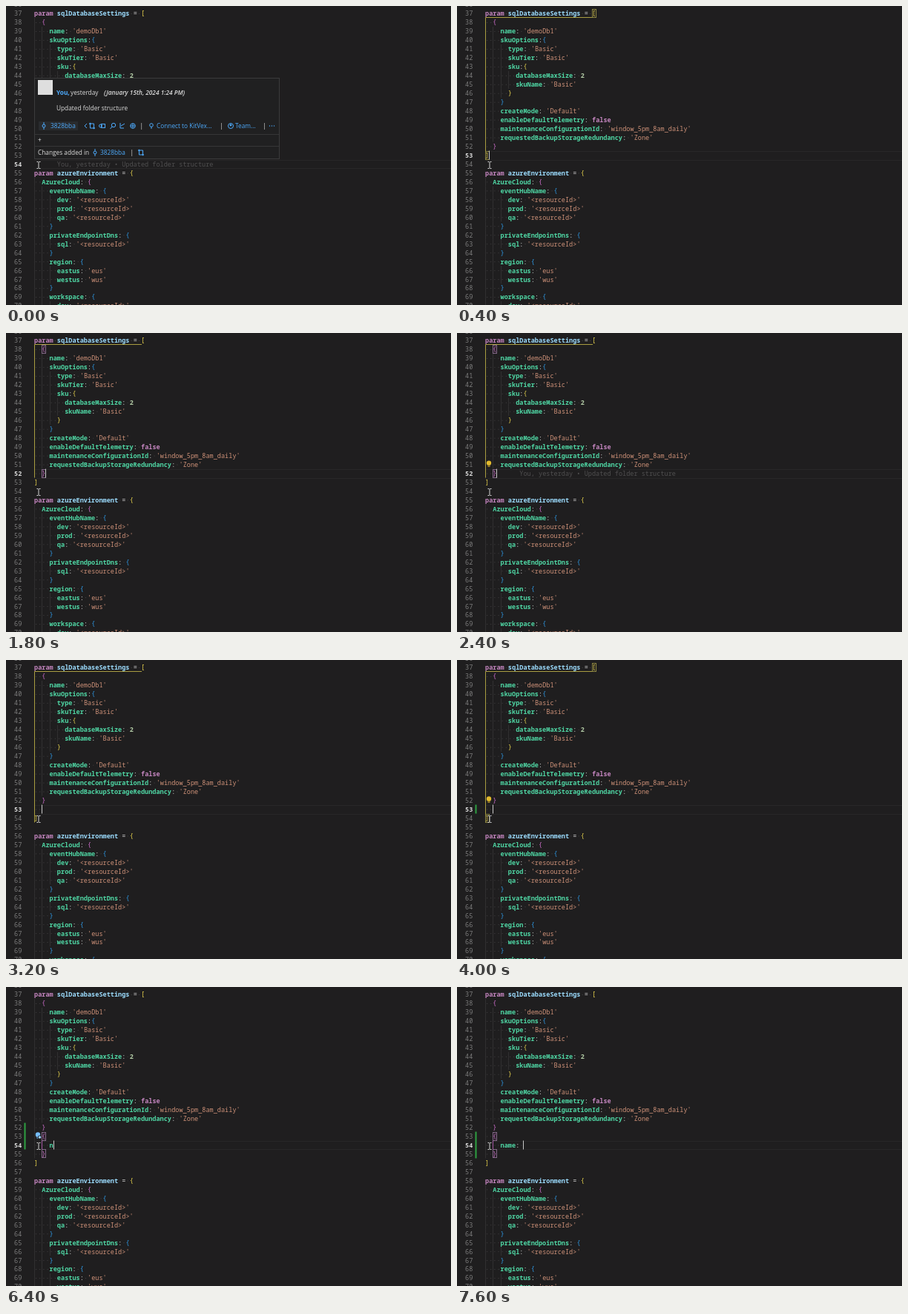
Animation of 600x404 px, one loop 8 s. Source, as an HTML page with a canvas:

```html
<!DOCTYPE html>
<html lang="en">
<head>
<meta charset="utf-8">
<title>Editing a settings array</title>
<style>
  html, body { margin: 0; width: 100%; height: 100%; overflow: hidden; background: #1f1e1f; }
  canvas { display: block; width: 600px; height: 404px; }
</style>
</head>
<body>
<canvas id="stage"></canvas>
<script>
const canvas = document.getElementById('stage');
const ctx = canvas.getContext('2d');
const ratio = window.devicePixelRatio || 1;
canvas.width = 600 * ratio;
canvas.height = 404 * ratio;

const LOOP = 8000, FIRST = 36, LEFT = 38, CHAR = 5.145, ROW = 11.97, BASE = 3.4;
const MONO = '8.575px "Noto Sans Mono", "DejaVu Sans Mono", monospace';
const UI = '"Open Sans", "Noto Sans", sans-serif';
const GOLD = '#e8d44d', PINK = '#d16fce', BLUE = '#2f9be8', LINK = '#4daafc';
const BRACKETS = [GOLD, PINK, BLUE];

const head = `
param sqlDatabaseSettings = [
  {
    name: 'demoDb1'
    skuOptions:{
      type: 'Basic'
      skuTier: 'Basic'
      sku:{
        databaseMaxSize: 2
        skuName: 'Basic'
      }
    }
    createMode: 'Default'
    enableDefaultTelemetry: false
    maintenanceConfigurationId: 'window_5pm_8am_daily'
    requestedBackupStorageRedundancy: 'Zone'
  }`.split('\n');

const tail = `]

param azureEnvironment = {
  AzureCloud: {
    eventHubName: {
      dev: '<resourceId>'
      prod: '<resourceId>'
      qa: '<resourceId>'
    }
    privateEndpointDns: {
      sql: '<resourceId>'
    }
    region: {
      eastus: 'eus'
      westus: 'wus'
    }
    workspace: {
      dev: '<resourceId>'`.split('\n');

const words = ['name', 'skuName', 'eventHubName', 'region', 'enableDefaultTelemetry',
  'maintenanceConfigurationId', 'azureEnvironment', 'sqlDatabaseSettings', 'privateEndpointDns'];

const block = text => ['  {', '    ' + text, '  }'];
const arrayPair = end => [[37, 28], [end, 0]];
const typed = (text, more) => ({ added: block(text), col: 4 + text.length, ...more });

// Each step changes the editor state from its time on.
const steps = [
  [0, { added: [], row: 54, col: 0, caret: false, popup: true, blame: true, pair: [] }],
  [200, { popup: false, caret: true }],
  [400, { row: 53, col: 1, blame: false, pair: arrayPair(53), guide: 53 }],
  [800, { blame: true }],
  [1000, { bulb: 52, caret: false }],
  [1200, { caret: true }],
  [1400, { row: 52, col: 1, blame: false, bulb: 0 }],
  [1800, { col: 3, pair: [[38, 2], [52, 2]] }],
  [2000, { blame: true, bulb: 51 }],
  [2600, { caret: false }],
  [3000, { added: ['  '], row: 53, col: 2, caret: true, blame: false, bulb: 0, pair: [], guide: 54 }],
  [3400, { bar: [53, 53] }],
  [4000, { bulb: 52, pair: arrayPair(54) }],
  [4400, { added: ['  {}'], col: 3, bulb: 0, pair: [[53, 2], [53, 3]], guide: 0 }],
  [4600, typed('', { row: 54, pair: [[53, 2], [55, 2]], inner: true })],
  [4800, { bulb: 52, blueBulb: true, errors: true }],
  [5400, { caret: false }],
  [5600, { caret: true }],
  [6000, { errors: false, bar: [52, 54] }],
  [6200, typed('n', { bulb: 53 })],
  [6600, { list: 9, bulb: 0 }],
  [6800, typed('na', { list: 3, bar: [53, 55] })],
  [7000, typed('nam', { list: 2 })],
  [7200, typed('name')],
  [7400, typed('name:', { list: 0 })],
  [7600, typed('name: ')]
];

const colX = col => LEFT + col * CHAR;
const midY = row => 10 + (row - 37) * ROW;
const topY = row => midY(row) - ROW / 2;

function fill(color, x, y, w, h) {
  ctx.fillStyle = color;
  ctx.fillRect(x, y, w, h);
}

function line(color, points) {
  ctx.strokeStyle = color;
  ctx.lineWidth = 1;
  ctx.beginPath();
  points.forEach(([x, y]) => ctx.lineTo(x, y));
  ctx.stroke();
}

function frame(color, x, y, w, h) {
  ctx.strokeStyle = color;
  ctx.lineWidth = 1;
  ctx.strokeRect(x, y, w, h);
}

function disc(color, x, y, r) {
  ctx.fillStyle = color;
  ctx.beginPath();
  ctx.arc(x, y, r, 0, 7);
  ctx.fill();
}

function ring(color, x, y, r) {
  ctx.strokeStyle = color;
  ctx.lineWidth = 1;
  ctx.beginPath();
  ctx.arc(x, y, r, 0, 7);
  ctx.stroke();
}

function text(string, x, y, color, font) {
  ctx.font = font;
  ctx.fillStyle = color;
  ctx.fillText(string, x, y);
}

const ui = (string, x, y, color = '#dcdcdc', style = '') =>
  text(string, x, y + 3, color, `${style} 8.3px ${UI}`);

function tokenColor(token, rest) {
  if (token[0] === "'") return '#ce9178';
  if (token === 'param' || token === 'false') return '#c586c0';
  if (/^\d/.test(token)) return '#b5cea8';
  if (/^\w/.test(token)) return rest[0] === ' ' ? '#9cdcfe' : '#4fd6a4';
  return '#d4d4d4';
}

function drawCode(lines) {
  let depth = 0;
  lines.forEach((source, i) => {
    const row = FIRST + i, y = midY(row);
    const indent = source.search(/\S|$/);
    for (let col = 0; col < indent; col += 2) {
      fill('#313031', Math.round(colX(col)), topY(row), 1, ROW);
    }
    for (const match of source.matchAll(/'[^']*'|\w+|\S| /g)) {
      const token = match[0], x = colX(match.index);
      if (token === ' ') {
        fill('#454345', x + 2.1, y, 1, 1);
        continue;
      }
      let color = tokenColor(token, source.slice(match.index + token.length));
      if (/[\[{]/.test(token)) color = BRACKETS[depth++ % 3];
      if (/[\]}]/.test(token)) color = BRACKETS[--depth % 3];
      const weight = /^\w/.test(token) ? 600 : 500;
      text(token, x, y + BASE, color, `${weight} ${MONO}`);
    }
  });
}

function drawNumbers(count, active) {
  for (let row = FIRST; row < FIRST + count; row++) {
    const on = row === active;
    text(row, 11, midY(row) + BASE, on ? '#d8d8d8' : '#7c7c7c', (on ? '600 ' : '') + MONO);
  }
}

function drawGuides(state) {
  if (state.guide) {
    const end = Math.round(topY(state.guide)) + 11.5;
    const bottom = state.row === 52 ? end - 12 : end;
    line('#a99d41', [[colX(28) + 1, 15.5], [38.5, 15.5], [38.5, bottom]]);
  }
  if (state.inner) line('#a657a5', [[48.5, topY(54)], [48.5, topY(55)]]);
  for (const [row, col] of state.pair) {
    const color = row === 37 || col === 0 ? '#8f8842' : '#85688a';
    frame(color, Math.round(colX(col)) + 0.5, Math.round(topY(row)) + 0.5, 5, 11);
  }
}

function squiggle(from, to, y) {
  const points = [];
  for (let x = from; x <= to; x += 2) points.push([x, y + (points.length % 2 ? -1 : 0.5)]);
  line('#f14c4c', points);
}

function drawBulb(row, blue) {
  const y = midY(row) - 1.5, color = blue ? '#75beff' : '#e3ba2c';
  disc(color, 43, y - 0.5, 3.2);
  fill(color, 41.5, y + 2, 3, 2.6);
  fill('#1f1e1f', 41.5, y + 2.8, 3, 0.7);
  if (blue) {
    disc('#1f1e1f', 45.5, y + 3, 2.6);
    disc('#9dd2ff', 45.5, y + 3, 1.8);
  }
}

function drawPointer() {
  line('#d6d6d6', [[44, 211], [44, 219]]);
  for (const y of [210.5, 219.5]) {
    line('#d6d6d6', [[41.5, y], [43.5, y]]);
    line('#d6d6d6', [[44.5, y], [46.5, y]]);
  }
}

function commitIcon(x, y) {
  ring(LINK, x, y, 2);
  line(LINK, [[x, y - 5], [x, y - 2]]);
  line(LINK, [[x, y + 2], [x, y + 5]]);
}

function compareIcon(x, y) {
  line(LINK, [[x - 2.5, y - 2], [x - 2.5, y + 3], [x + 1, y + 3]]);
  line(LINK, [[x - 1, y - 3], [x + 2.5, y - 3], [x + 2.5, y + 2]]);
  disc(LINK, x - 2.5, y - 3, 1.3);
  disc(LINK, x + 2.5, y + 3, 1.3);
}

function drawPopup() {
  fill('#202021', 38, 97, 330, 110);
  frame('#3b3b3c', 38.5, 97.5, 330, 109);
  fill('#dedede', 43, 100, 20, 20);
  ui('You,', 68, 117, LINK, 'bold');
  ui('yesterday', 87, 117);
  ui('(January 15th, 2024 1:24 PM)', 132, 117, '#dcdcdc', 'italic 600');
  ui('Updated folder structure', 68, 138);

  fill('#292b2e', 44, 156, 53, 12);
  commitIcon(51, 162);
  ui('3828bba', 60, 162, LINK);
  line(LINK, [[109, 159], [106, 162], [109, 165]]);
  compareIcon(116, 162);
  frame(LINK, 128.5, 159.5, 5, 5);
  ring(LINK, 127.5, 162, 2);
  ring(LINK, 145, 161, 2.7);
  line(LINK, [[143, 163], [140.5, 166]]);
  line(LINK, [[154, 158], [154, 165], [159, 165]]);
  line(LINK, [[155, 162], [160, 159]]);
  ring(LINK, 171, 162, 3.3);
  line(LINK, [[168, 162], [174, 162]]);
  line(LINK, [[171, 159], [171, 165]]);
  for (const x of [180.5, 288, 346]) ui('|', x, 162);
  ring(LINK, 196, 161, 2.3);
  line(LINK, [[196, 163], [196, 166]]);
  ui('Connect to KitVex...', 203, 162, LINK);
  ring(LINK, 303, 162, 3.5);
  disc(LINK, 303, 161, 1.4);
  ui('Team...', 309, 162, LINK);
  for (const x of [355.5, 358.5, 361.5]) disc(LINK, x, 162, 0.7);

  fill('#363637', 39, 173, 329, 1);
  ui('+', 43, 181);
  fill('#363637', 39, 189, 329, 1);
  ui('Changes added in', 43, 198);
  commitIcon(120, 198);
  ui('3828bba', 127, 198, LINK);
  ui('|', 167.5, 198);
  compareIcon(182, 198);
}

function drawList(count) {
  const step = 12.5, top = 220;
  fill('#252526', 51, top, 288, count * step);
  fill('#04395e', 51, top, 288, step);
  frame('#454545', 51.5, top + 0.5, 288, count * step);
  words.slice(0, count).forEach((word, i) => {
    const y = top + (i + 0.5) * step + 3;
    text('abc', 54, y - 0.5, '#b0b0b0', `5.5px ${UI}`);
    text(word, 66, y, '#d4d4d4', MONO);
  });
}

function draw(state) {
  const lines = [...head, ...state.added, ...tail].slice(0, 35);
  const { row, col } = state;
  ctx.setTransform(ratio, 0, 0, ratio, 0, 0);
  fill('#1f1e1f', 0, 0, 600, 404);
  for (const edge of [row, row + 1]) fill('#282728', LEFT, Math.round(topY(edge)), 562, 1);
  drawNumbers(lines.length, row);
  drawCode(lines);
  drawGuides(state);
  if (state.blame) {
    const end = lines[row - FIRST].length;
    text('You, yesterday • Updated folder structure', colX(end + 6), midY(row) + BASE, '#504f50', MONO);
  }
  if (state.bar) {
    const [from, to] = state.bar;
    fill('#2ea043', 24.5, topY(from), 2, (to - from + 1) * ROW);
  }
  if (state.errors) {
    squiggle(48, 53, topY(54));
    squiggle(38, 58, topY(55));
    squiggle(38, 53, topY(56));
  }
  if (state.bulb) drawBulb(state.bulb, state.blueBulb);
  if (state.caret) fill('#c8c8c8', Math.round(colX(col)), topY(row), 1, ROW);
  if (state.list) drawList(state.list);
  if (state.popup) drawPopup();
  drawPointer();
}

function tick() {
  const time = performance.now() % LOOP;
  draw(Object.assign({}, ...steps.filter(([at]) => at <= time).map(([, change]) => change)));
  requestAnimationFrame(tick);
}
tick();
</script>
</body>
</html>
```
